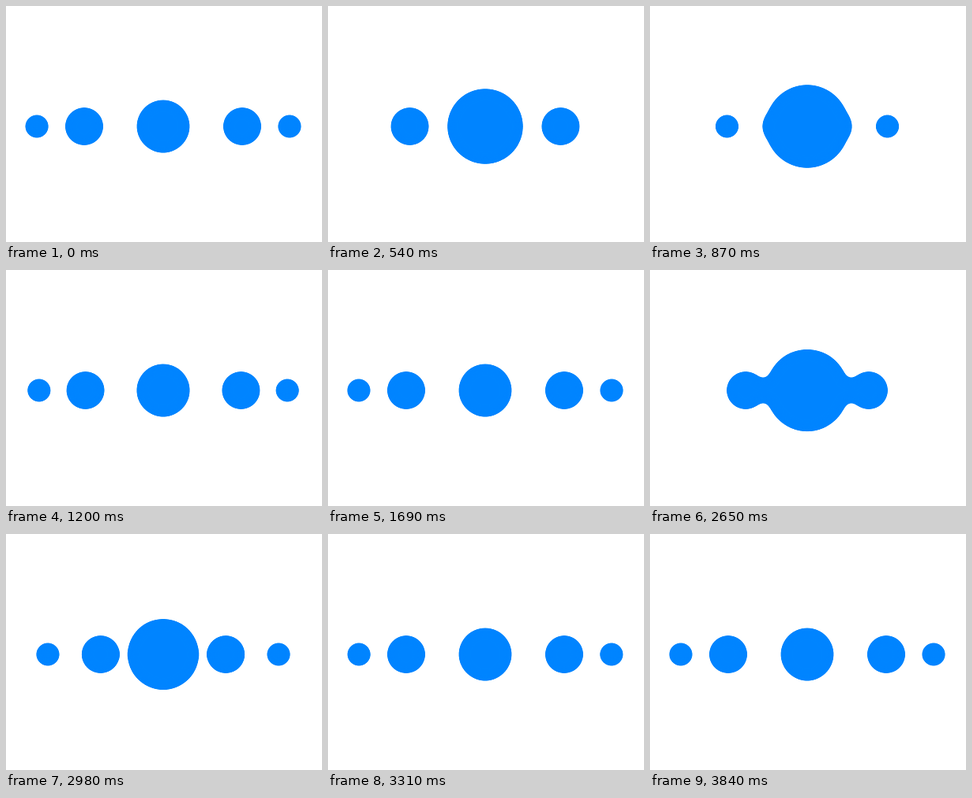
These frames come from a looping animation (400x300 px, 3900 ms). An HTML page:

```html
<!DOCTYPE html>
<html lang="en">
<head>
<meta charset="utf-8">
<title>Gooey dots</title>
<style>
  html, body { margin: 0; height: 100%; overflow: hidden; background: #fff; }
  svg { display: block; width: 400px; height: 300px; }
</style>
</head>
<body>
<svg viewBox="0 0 400 300">
  <filter id="goo" filterUnits="userSpaceOnUse" x="0" y="0" width="400" height="300" color-interpolation-filters="sRGB">
    <feGaussianBlur stdDeviation="6"/>
    <feColorMatrix values="1 0 0 0 0  0 1 0 0 0  0 0 1 0 0  0 0 0 20 -8"/>
  </filter>
  <g filter="url(#goo)" fill="#0084ff">
    <circle id="core" cx="199" cy="153"/>
    <circle class="medium" cy="153" r="23.6"/>
    <circle class="medium" cy="153" r="23.6"/>
    <circle class="small" cy="153" r="14.6"/>
    <circle class="small" cy="153" r="14.6"/>
  </g>
</svg>
<script>
const LOOP = 3900, STEP = 30, CENTER = 199;

// The loop holds two passes of the same motion at slightly different speeds.
const PASSES = [
  { start: 0, lead: 108, span: 1600 },
  { start: 1840, lead: 165, span: 1792 }
];

// Key points: [progress, value]
const CORE = [[.06, 32.9], [.26, 51.5], [.43, 47], [.61, 52], [.86, 32.9]];
const MEDIUM = [[.06, 100], [.36, -95.5], [.365, -95.5], [.915, 100]];
const SMALL = [[0, 160], [1, -160]];

const core = document.getElementById('core');
const mediums = document.querySelectorAll('.medium');
const smalls = document.querySelectorAll('.small');

const ease = u => u < .5 ? 8 * u ** 4 : 1 - 8 * (1 - u) ** 4;

function track(keys, p) {
  if (p <= keys[0][0]) return keys[0][1];
  for (let i = 1; i < keys.length; i++) {
    const [a, from] = keys[i - 1], [b, to] = keys[i];
    if (p < b) return from + (to - from) * ease((p - a) / (b - a));
  }
  return keys[keys.length - 1][1];
}

function mirror([left, right], offset) {
  left.setAttribute('cx', CENTER - offset);
  right.setAttribute('cx', CENTER + offset);
}

function draw() {
  const t = performance.now() % LOOP;
  const { start, lead, span } = PASSES[t < PASSES[1].start ? 0 : 1];
  const p = (Math.floor((t - start) / STEP) * STEP + lead) / span;
  core.setAttribute('r', track(CORE, p));
  mirror(mediums, track(MEDIUM, p));
  mirror(smalls, track(SMALL, p));
  requestAnimationFrame(draw);
}
draw();
</script>
</body>
</html>
```
